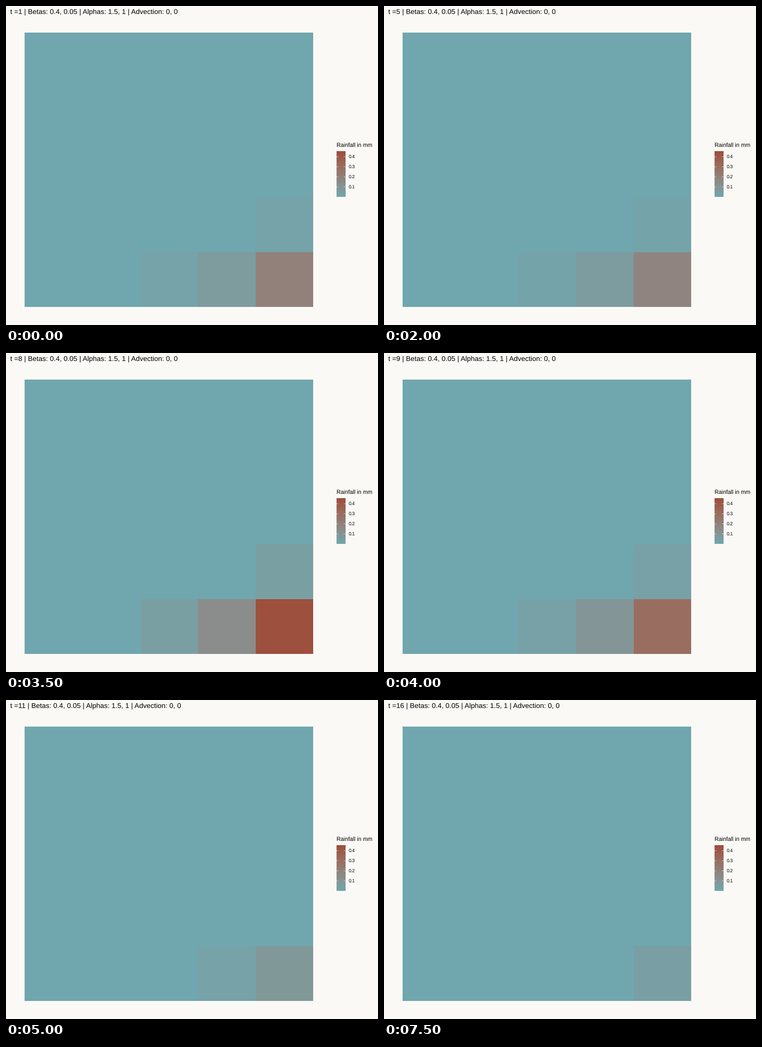
A matplotlib script for the animation above (8 s loop, 700x600 px).

```python
import numpy as np
import matplotlib.pyplot as plt
from matplotlib.animation import FuncAnimation
from matplotlib.patches import Rectangle

W, H, DPI = 700, 600, 100
STEPS, STEP_MS = 16, 500
LOW, HIGH, VMAX = (112, 166, 174), (158, 78, 60), 0.455
GRID = 5
BURSTS = (4, 7, 8, 8, 9)  # steps with extra rain, a repeat counts twice
STORM_END = 11

plt.rcParams.update({"font.family": "Liberation Sans", "text.hinting": "none"})

XYZ = np.array([[0.4124, 0.3576, 0.1805],
                [0.2126, 0.7152, 0.0722],
                [0.0193, 0.1192, 0.9505]])
WHITE = XYZ.sum(axis=1)


def to_lab(rgb):
    c = np.array(rgb) / 255
    lin = np.where(c > 0.04045, ((c + 0.055) / 1.055) ** 2.4, c / 12.92)
    x, y, z = np.cbrt(XYZ @ lin / WHITE)
    return np.array([116 * y - 16, 500 * (x - y), 200 * (y - z)])


def to_rgb(lab):
    y = (lab[0] + 16) / 116
    f = np.array([y + lab[1] / 500, y, y - lab[2] / 200])
    lin = np.clip(np.linalg.solve(XYZ, f ** 3 * WHITE), 0, 1)
    c = np.where(lin > 0.0031308, 1.055 * lin ** (1 / 2.4) - 0.055, 12.92 * lin)
    return np.clip(c, 0, 1)


LAB_LOW, LAB_HIGH = to_lab(LOW), to_lab(HIGH)


def shade(value):
    return to_rgb(LAB_LOW + min(value / VMAX, 1) * (LAB_HIGH - LAB_LOW))


def peak(t):
    """Rainfall in the bottom right corner at step t."""
    if t >= STORM_END:
        return 0.078 * np.exp(-0.15 * (t - STORM_END))
    return 0.2 - 0.005 * (t - 1) + 0.14 * BURSTS.count(t)


def rainfall(t, row, col):
    """Rain fades away from the corner; traces too faint to show are dropped."""
    dx, dy = GRID - 1 - col, GRID - 1 - row
    value = peak(t) * np.exp(-1.2 * dx - 2.4 * dy)
    return value if value > 0.015 else 0


fig = plt.figure(figsize=(W / DPI, H / DPI), dpi=DPI, facecolor="#FAF9F6")
ax = fig.add_axes([0, 0, 1, 1])


def text(x, y, s, px):
    return ax.text(x, y, s, size=px * 72 / DPI, color="black", va="baseline")


# Rainfall grid
xs = np.ceil(np.linspace(35, 578, GRID + 1))
ys = np.round(np.linspace(50, 566, GRID + 1))
cells = {}
for row in range(GRID):
    for col in range(GRID):
        cells[row, col] = ax.add_patch(Rectangle(
            (xs[col], ys[row]), xs[col + 1] - xs[col], ys[row + 1] - ys[row],
            linewidth=0, antialiased=False))

# Colour bar
LEFT, RIGHT, TOP, BOTTOM = 622, 639, 273, 359
ramp = [[shade(v)] for v in np.linspace(VMAX, 0, BOTTOM - TOP)]
ax.imshow(ramp, extent=(LEFT, RIGHT, BOTTOM, TOP), aspect="auto",
          interpolation="nearest")
text(622, 266, "Rainfall in mm", 10.6)
for v in (0.1, 0.2, 0.3, 0.4):
    y = BOTTOM - (BOTTOM - TOP) * v / VMAX
    for x in (LEFT, RIGHT - 3.4):
        ax.plot([x, x + 3.4], [y, y], color="white", lw=0.4,
                solid_capstyle="butt", snap=False)
    text(644.6, y + 2.9, f"{v:.1f}", 8.8)

title = text(8, 15.6, "", 13.2)
ax.set(xlim=(0, W), ylim=(H, 0))
ax.axis("off")


def update(i):
    t = i + 1
    title.set_text(f"t ={t} | Betas: 0.4, 0.05 | Alphas: 1.5, 1 | Advection: 0, 0")
    for (row, col), cell in cells.items():
        cell.set_facecolor(shade(rainfall(t, row, col)))
    return [title, *cells.values()]


anim = FuncAnimation(fig, update, frames=STEPS, interval=STEP_MS,
                     repeat=True, repeat_delay=0, blit=False)
plt.show()
```
